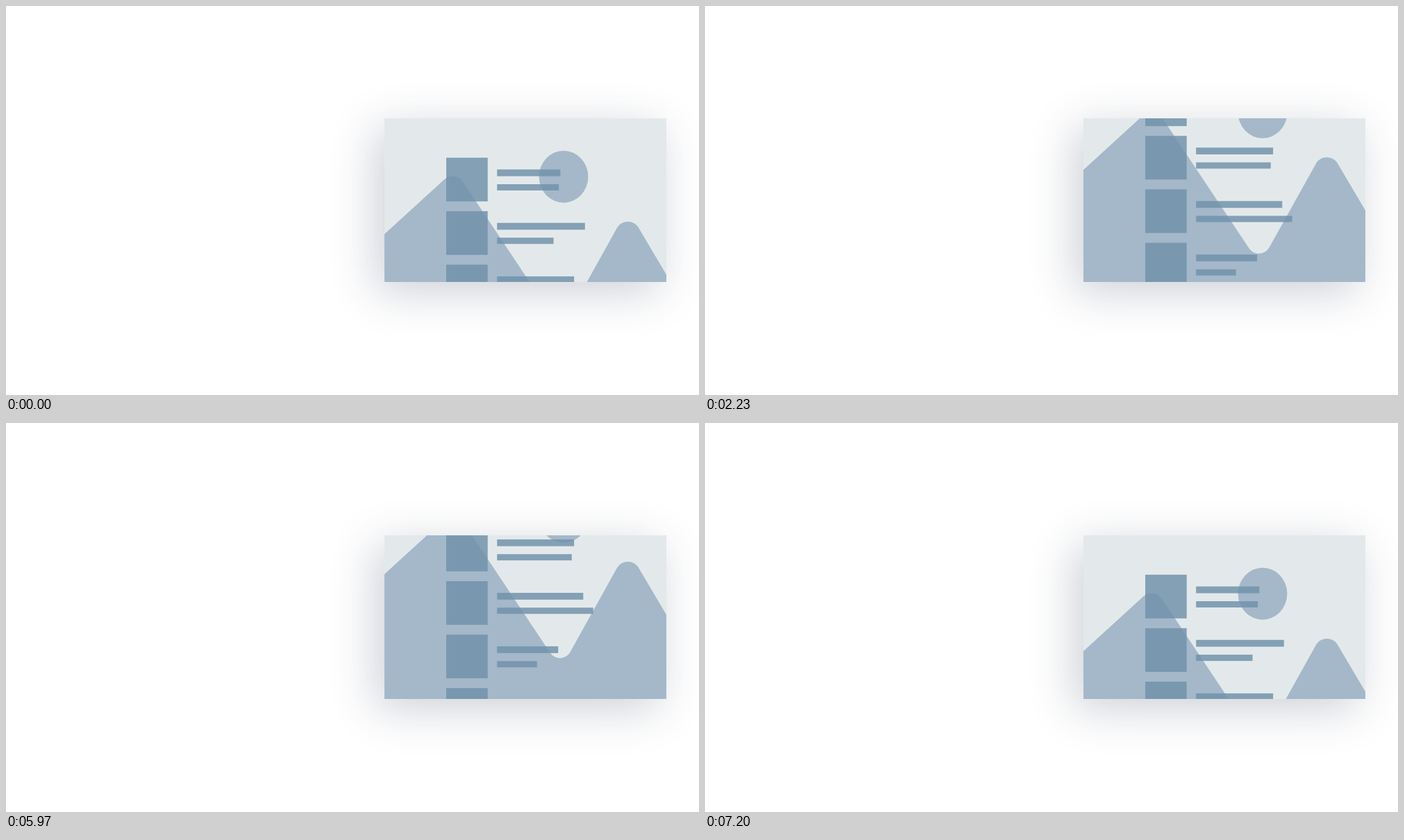
Write an HTML page with a canvas that moves like this. It is 998x561 px and loops after 8.03 s.

```html
<!DOCTYPE html>
<html lang="en">
<head>
<meta charset="utf-8">
<title>Parallax scroll</title>
<style>
  html, body { margin: 0; width: 100%; height: 100%; overflow: hidden; background: #fff; }
  canvas {
    position: absolute; left: 545px; top: 162px;
    background: #e3e9ea;
    box-shadow: -12px 14px 60px rgba(40, 50, 80, .23);
  }
</style>
</head>
<body>
<canvas id="card" width="406" height="236"></canvas>
<script>
const card = document.getElementById('card');
const ctx = card.getContext('2d');
const LOOP = 8030;
const ROWS = 6, PITCH = 77.1;

// Scroll position after each move
const moves = [
  { start: 500, length: 490, to: 74 },
  { start: 1500, length: 850, to: 187 },
  { start: 3000, length: 1200, to: 234 },
  { start: 5500, length: 1700, to: 0 }
];

// cubic-bezier(.87, 0, .17, 1), solved by bisection
function ease(x) {
  let lo = 0, hi = 1;
  for (let i = 0; i < 30; i++) {
    const s = (lo + hi) / 2, u = 1 - s;
    if (3 * u * s * (.87 * u + .17 * s) + s ** 3 < x) lo = s;
    else hi = s;
  }
  return lo * lo * (3 - 2 * lo);
}

function scrollAt(t) {
  let pos = 0;
  for (const { start, length, to } of moves) {
    const x = Math.min(1, Math.max(0, (t - start) / length));
    pos += (to - pos) * ease(x);
  }
  return pos;
}

function drawLandscape() {
  ctx.fillStyle = '#a4b8ca';
  ctx.beginPath();
  ctx.ellipse(803, 246.2, 35.4, 37.5, 0, 0, 2 * Math.PI);
  ctx.fill();

  // Peak, valley, peak, all rounded alike
  ctx.beginPath();
  ctx.moveTo(545, 329);
  ctx.arcTo(646.5, 236.2, 799, 465.6, 17.5);
  ctx.arcTo(799, 465.6, 895, 292.8, 17);
  ctx.arcTo(895, 292.8, 951, 387.5, 18);
  ctx.lineTo(951, 387.5);
  ctx.lineTo(951, 700);
  ctx.lineTo(545, 700);
  ctx.fill();
}

function drawList() {
  ctx.fillStyle = 'rgba(115, 147, 172, .85)';
  for (let i = 0; i < ROWS; i++) {
    const y = 218.8 + PITCH * i;
    const flip = i % 2 ? 1 : -1;
    const first = 104 + 17.5 * Math.cos(.9 * i - 1.71) + 10.5 * flip;
    const second = 102 - 35 * Math.sin(1.85 * i) + 13 * flip;
    ctx.fillRect(634, y, 59.7, 63);
    ctx.fillRect(707.2, y + 16.9, first, 9.8);
    ctx.fillRect(707.2, y + 38.2, second, 9);
  }
}

function layer(offset, draw) {
  ctx.setTransform(1, 0, 0, 1, -545, -162 - offset);
  draw();
}

function frame(t) {
  const scroll = scrollAt(t);
  ctx.resetTransform();
  ctx.clearRect(0, 0, card.width, card.height);
  layer(scroll / 2, drawLandscape);
  layer(scroll, drawList);
}

const origin = performance.now();
function tick() {
  frame((performance.now() - origin) % LOOP);
  requestAnimationFrame(tick);
}
tick();
</script>
</body>
</html>
```
